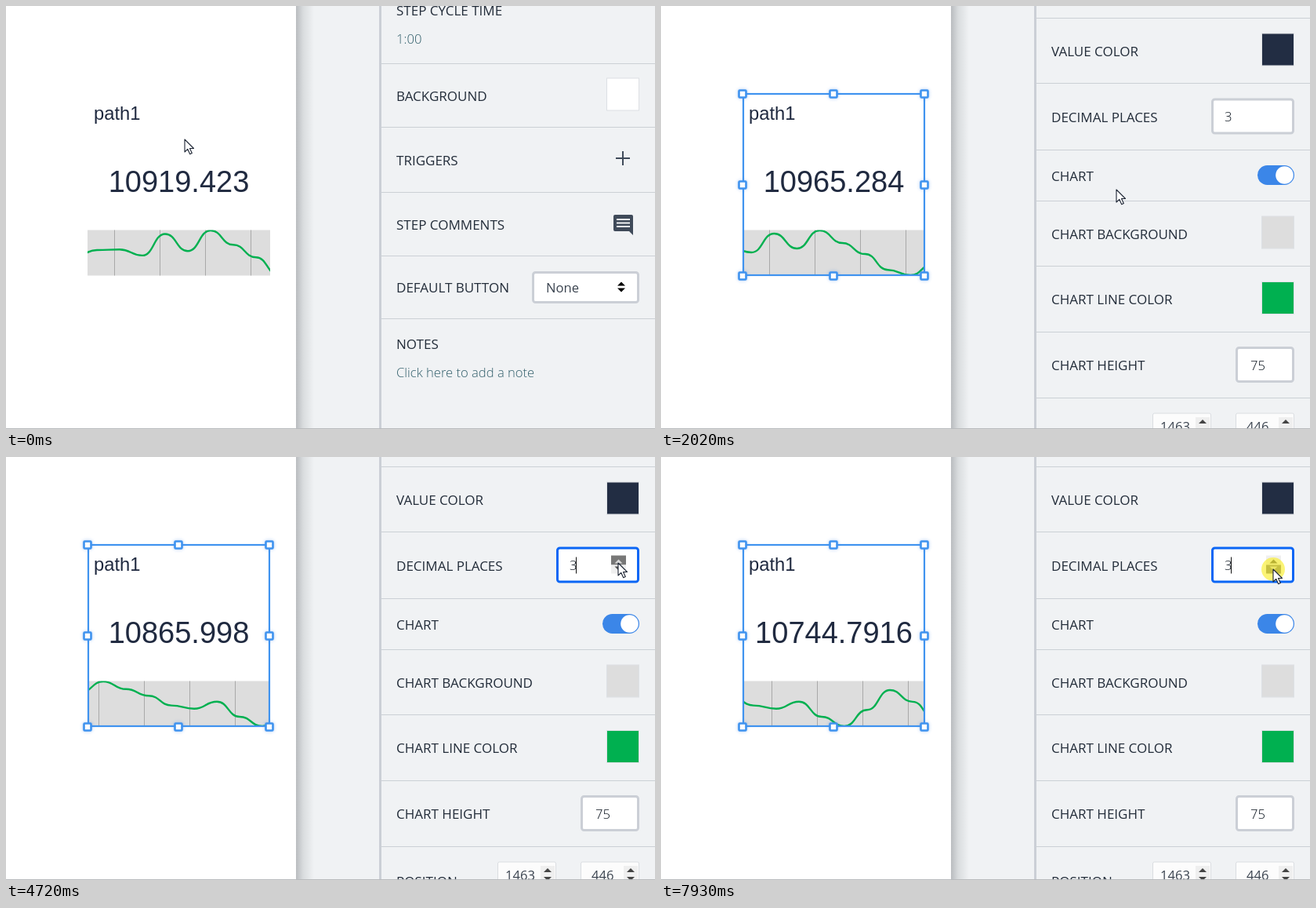
Write an HTML page that moves like this. It is 828 px wide and 539 px high and loops after 8 s.

```html
<!DOCTYPE html>
<html lang="en">
<head>
<meta charset="utf-8">
<title>Widget settings</title>
<style>
  html, body { margin: 0; width: 828px; height: 539px; overflow: hidden; background: #f0f2f4; }
  svg { display: block; }
  .label, .value { font-family: "Open Sans", "Noto Sans", sans-serif; }
  .label { font-size: 17px; font-weight: 500; fill: #222c39; }
  .value { font-size: 16.6px; fill: #3a434f; }
  .light { font-weight: 300; fill: #0d1620; }
  .note { font-weight: 300; fill: #33606c; }
  .widget { font-family: "Liberation Sans", Arial, sans-serif; fill: #202a40; }
  .rule { fill: #cbd0d5; }
  .box { fill: #fff; stroke: #cbcfd6; stroke-width: 3; }
  .thin { fill: #fcfcfc; stroke: #dadde1; }
  .handle { fill: #fff; stroke: #3f93ef; stroke-width: 2.6; filter: drop-shadow(0 0 2px rgba(70, 140, 230, .45)); }
</style>
</head>
<body>
<svg id="stage" width="828" height="539" viewBox="0 0 828 539"></svg>
<script>
const LOOP = 8000, RIGHT = 808;
const NAVY = '#222d43', GREEN = '#00b050', DARK = '#3f4a59';

// ---- markup helpers; controls are placed around the middle y of their row ----
const rect = (x, y, w, h, attrs = '') =>
  `<rect x="${x}" y="${y}" width="${w}" height="${h}" ${attrs}/>`;
const text = (x, mid, str, cls, attrs = '') =>
  `<text x="${x}" y="${mid + 6}" class="${cls}" ${attrs}>${str}</text>`;
const tri = (x, y, w, h, attrs = 'fill="#3d3f43"') =>
  `<path d="M${x - w} ${y}h${2 * w}l${-w} ${h}z" ${attrs}/>`;
const updown = (x, mid, gap, up = '', down = '') => tri(x, mid - gap, 5, -5, up) + tri(x, mid + gap, 5, 5, down);
const box = (x, mid, h = 46, attrs = '') =>
  rect(x + 1.5, mid - h / 2 + 1.5, RIGHT - x - 3, h - 3, `class="box" rx="3" ${attrs}`);
const thin = (x, mid, w, h) => rect(x + .5, mid - h / 2 + .5, w - 1, h - 1, 'class="thin" rx="2"');
const swatch = fill => mid => rect(766.5, mid - 21.5, 41, 41, `fill="${fill}" stroke="#dde0e4"`);
const menu = (x, str) => mid =>
  thin(x, mid + .5, RIGHT - x, 42) + text(x + 16, mid, str, 'value') + tri(780, mid - 1.5, 5, 5);
const input = (x, str) => mid => box(x, mid) + text(x + 19, mid + 1, str, 'value light');
const toggle = mid => rect(761, mid - 12.5, 47, 25, 'rx="12.5" fill="#3b86e8"') +
  `<circle cx="795.5" cy="${mid}" r="11.3" fill="#fff"/>`;
const number = (x, tx, str) => mid => thin(x, mid - 7, 75, 35) + text(tx, mid - 7, str, 'value') +
  rect(x + 55, mid - 19, 18, 23, 'fill="#efefef"') +
  updown(x + 64, mid - 8, 3, 'fill="#444"', 'fill="#444"');
const places = mid => box(702, mid, 46, 'id="field"') + text(719, mid, '3', 'value light', 'id="digit"') +
  rect(727, mid - 10, 1, 21, 'id="caret" fill="#111"') +
  `<g id="spin">${rect(772, mid - 12, 19, 12, 'id="upHalf"')}${rect(772, mid, 19, 11, 'id="downHalf"')}
    ${updown(781.5, mid, 2, 'id="upTri"', 'id="downTri"')}</g>`;
const plus = mid => `<path d="M778 ${mid - 1.5}h18m-9-9v18" stroke="${DARK}" stroke-width="2"/>`;
const bubble = mid => `<g transform="translate(775 ${mid - 11.5})">
  <path d="M2 0h21q2 0 2 2v24l-5-5h-18q-2 0-2-2v-17q0-2 2-2z" fill="${DARK}"/>
  <path d="M4 6h17m-17 4.5h17m-17 4.5h17" stroke="#f0f2f4" stroke-width="2"/></g>`;
const select = mid => box(671, mid + .5, 41) + text(689, mid + 1, 'None', 'value') + updown(785, mid, 1.5);

// rows: [name, height, control]
function rows(top, list) {
  return list.map(([name, height, control]) => {
    const mid = top + height / 2;
    top += height;
    return text(498, mid + 1, name, 'label') + control(mid) + rect(479, top, 349, 1, 'class="rule"');
  }).join('');
}

const stepMarkup = rect(479, 73, 349, 1, 'class="rule"') +
  text(498, 6, 'STEP CYCLE TIME', 'label') + text(498, 42, '1:00', 'value note') +
  rows(73, [
    ['BACKGROUND', 81, swatch('#fff')],
    ['TRIGGERS', 83, plus],
    ['STEP COMMENTS', 81, bubble],
    ['DEFAULT BUTTON', 80, select],
  ]) +
  text(498, 431, 'NOTES', 'label') + text(498, 467, 'Click here to add a note', 'value note');

const widgetMarkup = rows(-38, [
  ['MACHINE', 82, menu(639, 'At this Station')],
  ['ATTRIBUTE', 82, menu(703, 'path1')],
  ['UNIT', 85, input(569, '')],
  ['BACKGROUND COLOR', 84, swatch('#fff')],
  ['LABEL SIZE', 84, input(733, '40')],
  ['LABEL COLOR', 84, swatch(NAVY)],
  ['VALUE SIZE', 84, input(733, '64')],
  ['VALUE COLOR', 83, swatch(NAVY)],
  ['DECIMAL PLACES', 85, places],
  ['CHART', 65, toggle],
  ['CHART BACKGROUND', 83, swatch('#ddd')],
  ['CHART LINE COLOR', 84, swatch(GREEN)],
  ['CHART HEIGHT', 84, input(733, '75')],
  ['POSITION', 88, mid => number(627, 637, '1463')(mid) + number(733, 747, '446')(mid)],
]);

const handles = [0, 1, 2].flatMap(i => [0, 1, 2].map(j => i === 1 && j === 1 ? '' :
  rect(99.5 + 116 * i, 107.5 + 116 * j, 9, 9, 'class="handle" rx="1"'))).join('');

const stage = document.getElementById('stage');
stage.innerHTML = `
  <defs>
    <linearGradient id="shade">
      <stop offset="0" stop-color="#b9bcbf"/><stop offset=".4" stop-color="#d9dcde"/>
      <stop offset="1" stop-color="#f0f2f4"/>
    </linearGradient>
    <clipPath id="chartClip">${rect(104, 285.5, 233, 58)}</clipPath>
  </defs>
  ${rect(0, 0, 828, 539, 'fill="#f0f2f4"')}
  ${rect(370, 0, 23, 539, 'fill="url(#shade)"')}
  ${rect(0, 0, 370, 539, 'fill="#fff"')}
  <text x="112" y="145" class="widget" font-size="23.75">path1</text>
  <text id="reading" x="220.5" y="237" class="widget" font-size="38" text-anchor="middle"></text>
  <g clip-path="url(#chartClip)">
    ${rect(104, 285, 233, 59, 'fill="#ddd"')}
    <path id="grid" stroke="#a9a9a9"/>
    <path id="curve" fill="none" stroke="${GREEN}" stroke-width="2.4"/>
  </g>
  <g id="selection">
    ${rect(105, 112, 231, 231, 'fill="none" stroke="#3f93ef" stroke-width="2.2"')}${handles}
  </g>
  <g id="stepPanel">${stepMarkup}</g>
  <g id="widgetPanel">${widgetMarkup}</g>
  ${rect(476, 0, 3, 539, 'fill="#cbcfd6"')}
  ${rect(0, 538, 828, 1, 'fill="#b9bbbd"')}
  <circle id="halo" r="15" fill="#f8ee20" fill-opacity=".62"/>
  <path id="arrow" d="M0 0v16l3.8-3.6 2.9 6.4 2.6-1.2-2.8-6.1h5z"
    fill="#fff" stroke="#1c2433" stroke-width="1.1" stroke-linejoin="round"/>
  <path id="beam" d="M-3.5-7h7M0-7v14M-3.5 7h7" fill="none" stroke="#222"/>`;

const ui = {};
stage.querySelectorAll('[id]').forEach(node => ui[node.id] = node);
const show = (node, on) => node.setAttribute('visibility', on ? 'visible' : 'hidden');
const move = (node, x, y) => node.setAttribute('transform', `translate(${x} ${y})`);
const fill = (node, color) => node.setAttribute('fill', color);

// ---- timeline, in ms ----
const SELECT = 430, FOCUS = 3270;
const ease = (t, from, to) => {
  const p = Math.min(1, Math.max(0, (t - from) / (to - from)));
  return p * p * (3 - 2 * p);
};

// pointer legs: start, end, x, y reached
const legs = [[480, 1150, 581, 234], [2500, 3130, 758, 145], [3900, 4350, 781, 135], [6400, 6750, 781, 143]];
const pointer = t => legs.reduce(([x, y], [from, to, x2, y2]) => {
  const p = ease(t, from, to);
  return [x + (x2 - x) * p, y + (y2 - y) * p];
}, [228, 170]);

// clicks: time and change of the decimal places
const clicks = [[20, 0], [3190, 0], [4690, 1], [5170, 1], [7240, -1], [7840, -1]];
const decimals = t => clicks.reduce((n, [at, change]) => t >= at + 80 ? n + change : n, 3);
const pressed = (t, change) => clicks.some(([at, c]) => c === change && t >= at && t < at + 280);

// ---- chart: one sample per second, scrolling left ----
const samples = [11040, 11083, 11087, 11048, 11187, 11077, 11210, 11117, 11036, 10919.42312,
  10879.98521, 10965.28437, 10782.91346, 10668.63418, 10865.99823, 11105.27364, 10964.63649, 10744.79162];
const GAP = 29, TOP = Math.max(...samples);
const lowest = n => Math.min(...samples.slice(0, n + 1));

function drawChart(t) {
  const shift = GAP * t / 1000;
  const last = 9 + Math.floor((t + 600) / 1000);
  const age = (t + 600) % 1000;
  const low = lowest(last) + (lowest(last - 1) - lowest(last)) * Math.exp(-age / 125);
  let d = '', prev;
  samples.slice(0, last + 1).forEach((v, i) => {
    const x = 87 + GAP * i - shift, mid = x - GAP / 2;
    const y = 286 + 57 * (TOP - v) / (TOP - low);
    d += i ? `C${mid} ${prev} ${mid} ${y} ${x} ${y}` : `M${x} ${y}`;
    prev = y;
  });
  ui.curve.setAttribute('d', d);
  let g = '';
  for (let x = 138.5 - Math.floor(shift); x < 340; x += 2 * GAP) g += `M${x} 285v59`;
  ui.grid.setAttribute('d', g);
  ui.reading.textContent = samples[last].toFixed(decimals(t - 80));
}

function drawField(t, over, onSpin, y) {
  ui.digit.textContent = decimals(t);
  ui.field.style.stroke = t >= FOCUS ? '#0b66f5' : '';
  const edits = clicks.filter(c => c[1]).map(c => c[0] + 80).filter(at => at <= t);
  show(ui.caret, t >= FOCUS && (t - Math.max(FOCUS, ...edits)) % 1060 < 530);
  show(ui.spin, over);
  for (const [name, hover, change] of [['up', y < 139, 1], ['down', y >= 139, -1]]) {
    const down = pressed(t, change);
    fill(ui[name + 'Half'], down ? '#777' : onSpin && hover ? '#cfcfcf' : '#efefef');
    fill(ui[name + 'Tri'], down ? '#d8d8d8' : '#505050');
  }
}

function draw(t) {
  const [x, y] = pointer(t);
  const selected = t >= SELECT;
  const over = t > 2900 && x > 702, onSpin = over && x > 770;
  drawChart(selected ? t : Math.min(t, 80));
  ui.stepPanel.style.display = selected ? 'none' : '';
  ui.widgetPanel.style.display = selected ? '' : 'none';
  show(ui.selection, selected);
  move(ui.widgetPanel, 0, -Math.round(535 * ease(t, 1340, 2052)));
  drawField(t, over, onSpin, y);
  show(ui.beam, over && !onSpin);
  show(ui.arrow, !over || onSpin);
  show(ui.halo, clicks.some(([at]) => t >= at + 60 && t < at + 280));
  move(ui.arrow, x, y);
  move(ui.beam, x + .5, y);
  move(ui.halo, x, y);
}

const start = performance.now();
function loop() {
  draw((performance.now() - start) % LOOP);
  requestAnimationFrame(loop);
}
loop();
</script>
</body>
</html>
```
